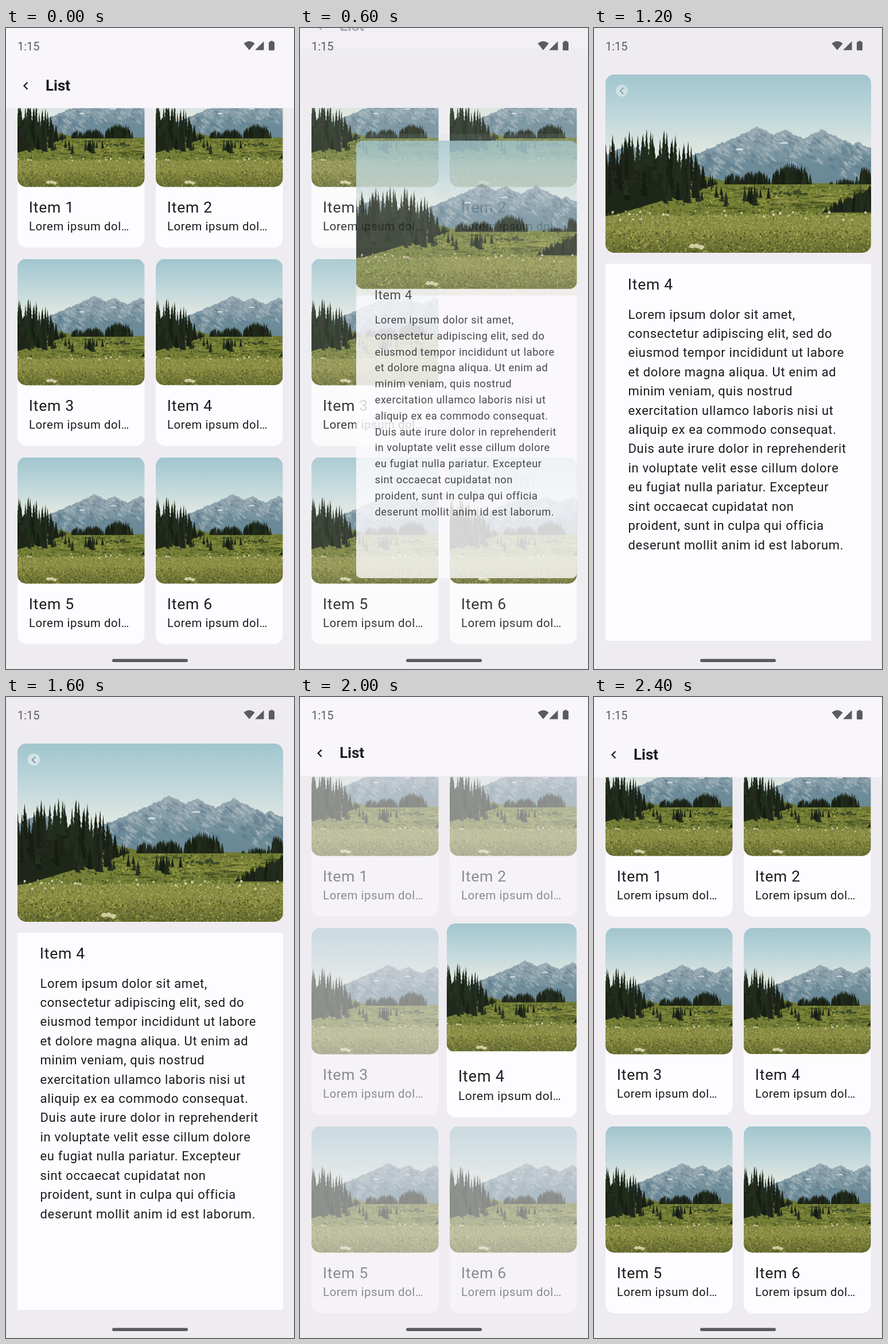
An HTML page with a canvas for the animation above (2.5 s loop, 502 px wide and 1115 px high).

```html
<!DOCTYPE html>
<html lang="en">
<head>
<meta charset="utf-8">
<title>List to detail transition</title>
<style>
  html, body { margin: 0; width: 100%; height: 100%; overflow: hidden; background: #eeecf1; }
  canvas { display: block; }
</style>
</head>
<body>
<canvas id="stage" width="502" height="1115"></canvas>
<script>
const ctx = document.getElementById('stage').getContext('2d');
ctx.imageSmoothingQuality = 'high';

const LOOP = 2500, STEP = 100, OPEN = 483, CLOSE = 1717, FADE = 700;
const PAGE = '#eeecf1', PAPER = '#fdfcfe', INK = '#1b1b1f', GREY = '#5c5b60';
const CARD = { x: 261, y: 401.5, w: 221.5, h: 325.5, image: 220 };
const DETAIL = { x: 20, y: 81, w: 463, h: 985, image: 310 };
const BODY = `Lorem ipsum dolor sit amet,
consectetur adipiscing elit, sed do
eiusmod tempor incididunt ut labore
et dolore magna aliqua. Ut enim ad
minim veniam, quis nostrud
exercitation ullamco laboris nisi ut
aliquip ex ea commodo consequat.
Duis aute irure dolor in reprehenderit
in voluptate velit esse cillum dolore
eu fugiat nulla pariatur. Excepteur
sint occaecat cupidatat non
proident, sunt in culpa qui officia
deserunt mollit anim id est laborum.`.split('\n');

// ---- Timing ----
const clamp = v => Math.max(0, Math.min(1, v));
const mix = (a, b, k) => a + (b - a) * k;

// Critically damped spring, angular frequency 20 per second
function spring(ms) {
  const x = Math.max(0, ms) * 0.02;
  return 1 - (1 + x) * Math.exp(-x);
}

// cubic-bezier(.4, 0, .2, 1)
function ease(x) {
  let lo = 0, hi = 1;
  for (let i = 0; i < 20; i++) {
    const s = (lo + hi) / 2, r = 1 - s;
    if (1.2 * r * r * s + 0.6 * r * s * s + s ** 3 < x) lo = s; else hi = s;
  }
  return 3 * (1 - lo) * lo * lo + lo ** 3;
}

// ---- Landscape ----
function makePhoto() {
  const W = DETAIL.w, H = DETAIL.image;
  const canvas = document.createElement('canvas');
  canvas.width = W;
  canvas.height = H;
  const g = canvas.getContext('2d');
  let seed = 11;
  const rand = (a = 0, b = 1) => {
    seed = (seed * 16807) % 2147483647;
    return a + (b - a) * seed / 2147483647;
  };
  const repeat = (n, draw) => { for (let i = 0; i < n; i++) draw(); };
  const wobble = x => Math.sin(x * 0.31) + Math.sin(x * 0.73 + 1) * 0.7 + Math.sin(x * 1.7) * 0.5;
  const gradient = (y0, y1, ...colors) => {
    const fill = g.createLinearGradient(0, y0, 0, y1);
    colors.forEach((c, i) => fill.addColorStop(i / (colors.length - 1), c));
    return fill;
  };
  // Fills everything between two curves of x
  const band = (fill, x0, x1, top, bottom) => {
    g.fillStyle = fill;
    g.beginPath();
    for (let x = x0; x <= x1; x++) g.lineTo(x, top(x));
    for (let x = x1; x >= x0; x--) g.lineTo(x, bottom(x));
    g.fill();
  };
  const dot = (x, y, rx, ry, color) => {
    g.fillStyle = color;
    g.beginPath();
    g.ellipse(x, y, rx, ry, 0, 0, 7);
    g.fill();
  };
  const conifer = (x, y, h) => {
    const w = Math.min(h * 0.2, 6.5);
    g.fillStyle = `hsl(${rand(85, 115)} ${rand(15, 25)}% ${rand(9, 16)}%)`;
    g.beginPath();
    g.moveTo(x, y - h);
    for (const side of [1, -1]) {
      for (let k = 1; k <= 6; k++) {
        const j = side > 0 ? k : 7 - k;
        g.lineTo(x + side * w * j / 6 * rand(0.8, 1.3), y - h + h * j / 6);
        g.lineTo(x + side * w * j / 6 * 0.55, y - h + h * j / 6);
      }
    }
    g.fill();
  };
  // Upright strokes of grass
  const grass = (n, y0, y1, size, hue, light) => repeat(n, () => {
    g.fillStyle = `hsl(${hue + rand(-8, 8)} ${rand(28, 42)}% ${light + rand(-16, 16)}%)`;
    g.fillRect(rand(-2, W), rand(y0, y1), rand(0.8, size), rand(0.8, size));
  });

  g.fillStyle = gradient(0, 135, '#a1c5ce', '#bdd6da', '#e0e7e1');
  g.fillRect(0, 0, W, H);

  // Mountains: the highest of a few peaks, with worn slopes
  const peaks = [[40, 120], [205, 117], [265, 90], [312, 95], [377, 95], [440, 117]];
  const ridge = x => Math.min(...peaks.map(([px, py]) => py + Math.abs(x - px) ** 0.9 * 0.72)) + wobble(x) * 0.9;
  band(gradient(90, 190, '#9aaab2', '#879faa', '#6d8c9a', '#6a8894'), 0, W, ridge, () => 195);
  repeat(420, () => {
    const x = rand(130, W), depth = rand() ** 1.5 * 55, y = ridge(x) + depth + 2, s = rand(2, 7);
    const lit = Math.sin(x * 0.13 + depth * 0.08) + rand(-0.8, 0.8) > 0;
    g.fillStyle = lit ? 'rgba(184,193,195,.42)' : 'rgba(84,112,130,.32)';
    g.beginPath();
    g.lineTo(x, y);
    g.lineTo(x + s, y + s * 0.9);
    g.lineTo(x + s * 1.8, y + s * 1.9);
    g.lineTo(x - s * 0.3, y + s);
    g.fill();
  });
  dot(234, 130, 7, 2, '#d3dbdd');
  dot(311, 119, 8, 1.6, '#d3dbdd');

  // Meadow
  const hill = x => 189 - 24 * Math.exp(-(((x - 120) / 65) ** 2));
  band(gradient(165, 250, '#5c6b2c', '#7a8336', '#6f7a33'), 0, W, hill, () => H);
  grass(1300, 191, 245, 4, 68, 34);
  repeat(70, () => dot(rand(140, W), rand(196, 240), rand(5, 18), rand(0.8, 2), 'rgba(50,64,28,.42)'));
  repeat(16, () => dot(rand(270, 400), rand(204, 224), rand(8, 24), rand(0.8, 2), 'rgba(160,158,76,.55)'));

  // Distant groves: centre, half width, height
  for (const [x, half, h] of [[222, 16, 22], [262, 24, 27], [325, 34, 40], [415, 24, 11], [451, 14, 34]])
    repeat(half * 1.6, () => {
      const off = rand(-1, 1);
      conifer(x + off * half, 191, h * (1 - 0.45 * off * off) * rand(0.7, 1));
    });

  // Forest on the left, falling towards the middle
  const crown = x => 111 + Math.abs(x - 90) * 0.17 + Math.max(0, x - 125) * 0.75;
  const floor = x => 249 - x * 0.3;
  band('#1d2618', 0, 130, x => crown(x) + 32 + wobble(x) * 3, floor);
  repeat(110, () => {
    const x = rand(0, 195), top = crown(x) + rand() ** 2 * 50;
    conifer(x, Math.min(top + rand(40, 62), floor(x)), Math.min(62, floor(x) - top));
  });
  repeat(24, () => {
    const x = rand(100, 172), h = rand(16, 38);
    conifer(x, rand(212, 225), h);
  });

  // Single trees and the dark right bank
  repeat(13, () => {
    const x = rand(180, 285), y = rand(206, 231);
    conifer(x, y, (y - 186) * rand(0.5, 0.8));
  });
  conifer(260, 228, 38);
  repeat(12, () => dot(rand(285, 350), rand(203, 212), rand(2, 5), 2, '#38472a'));
  band('#222c1a', 380, W, x => 238 - (x - 380) * 0.5 + wobble(x) * 2, () => 240);
  repeat(24, () => {
    const x = rand(378, W);
    conifer(x, 238, 8 + (x - 378) * 0.5 * rand(0.6, 1.1));
  });

  // Tall grass and flowers
  band(gradient(240, H, '#8d9049', '#86893f', '#5f672c'), 0, W, x => 245 + wobble(x), () => H);
  grass(2400, 241, 278, 2.4, 63, 44);
  grass(2200, 270, H, 3.2, 64, 36);
  repeat(34, () => {
    const x = rand(0, W), y = rand(235, 254), r = rand(1, 2.6);
    g.fillStyle = '#656d36';
    g.fillRect(x, y, 0.8, 13);
    dot(x, y, r, r, '#cccaa4');
  });
  for (const x of [151, 159, 167]) dot(x, 299 + wobble(x), 5, 4, '#cfcca2');
  return canvas;
}
const photo = makePhoto();

// ---- Drawing helpers ----
function text(string, x, y, size, { color = INK, weight = 400, spacing = 0 } = {}) {
  ctx.font = `${weight} ${size}px Roboto, sans-serif`;
  ctx.letterSpacing = spacing + 'px';
  ctx.fillStyle = color;
  ctx.fillText(string, x, y);
}
function roundBox(x, y, w, h, r, color) {
  ctx.beginPath();
  ctx.roundRect(x, y, w, h, r);
  if (color) {
    ctx.fillStyle = color;
    ctx.fill();
  }
}
function chevron(x, y, s, color, width) {
  ctx.beginPath();
  ctx.moveTo(x + s * 0.5, y - s);
  ctx.lineTo(x - s * 0.5, y);
  ctx.lineTo(x + s * 0.5, y + s);
  ctx.strokeStyle = color;
  ctx.lineWidth = width;
  ctx.stroke();
}

// Scales a w × h piece to the width of the box, centred vertically and clipped
function fit(box, w, h, alpha, draw) {
  const scale = box.w / w;
  ctx.save();
  ctx.beginPath();
  ctx.rect(box.x, box.y, box.w, box.h);
  ctx.clip();
  ctx.globalAlpha = alpha;
  ctx.translate(box.x, box.y + (box.h - h * scale) / 2);
  ctx.scale(scale, scale);
  draw();
  ctx.restore();
}

// Photo cropped to cover w × h, with rounded corners
function drawPhoto(w, h) {
  const width = photo.width * h / photo.height;
  ctx.save();
  roundBox(0, 0, w, h, 15);
  ctx.clip();
  ctx.drawImage(photo, (w - width) / 2, 0, width, h);
  ctx.restore();
}
function drawCard(n) {
  roundBox(0, 0, CARD.w, CARD.h, 16, PAPER);
  text('Item ' + n, 19.8, 264.5, 26.6, { spacing: 0.7 });
  text('Lorem ipsum dol…', 20, 295.5, 20.4, { spacing: 0.57 });
}
function drawDetail() {
  roundBox(0, 329, DETAIL.w, 656, 3, PAPER);
  text('Item 4', 38.8, 374, 26.6, { spacing: 0.7 });
  BODY.forEach((line, i) => text(line, 39.5, 424.5 + i * 33.42, 22, { spacing: 0.66 }));
}

// ---- Scene parts ----
function drawList(visible) {
  ctx.save();
  ctx.beginPath();
  ctx.rect(0, 139, 502, 976);
  ctx.clip();
  for (let i = 0; i < 6; i++) {
    if (i === 3) continue;
    ctx.save();
    ctx.translate(20 + (i % 2) * 241, 56.5 + Math.floor(i / 2) * 345);
    drawCard(i + 1);
    drawPhoto(CARD.w, CARD.image);
    ctx.restore();
  }
  ctx.globalAlpha = 1 - visible;
  ctx.fillStyle = PAGE;
  ctx.fillRect(0, 139, 502, 976);
  ctx.restore();
}
function drawShared(p, opening) {
  const box = {};
  for (const key of ['x', 'y', 'w', 'h']) box[key] = mix(CARD[key], DETAIL[key], p);
  const imageBox = { ...box, h: mix(CARD.image, DETAIL.image, p) };
  const sides = [
    { size: CARD, share: 1 - p, draw: () => drawCard(4) },
    { size: DETAIL, share: p, draw: drawDetail }
  ];
  if (!opening) sides.reverse();
  const [outgoing, incoming] = sides;
  outgoing.alpha = outgoing.share ** 2;
  incoming.alpha = incoming.share ** 0.6;

  ctx.save();
  roundBox(box.x, box.y, box.w, box.h, 16 * Math.sqrt(1 - p));
  ctx.clip();
  for (const { size, alpha, draw } of sides) fit(box, size.w, size.h, alpha, draw);
  for (const { size, alpha } of sides)
    fit(imageBox, size.w, size.image, alpha, () => drawPhoto(size.w, size.image));
  ctx.restore();
}
function drawHeader(hidden) {
  ctx.save();
  ctx.globalAlpha = Math.sqrt(1 - hidden);
  ctx.translate(0, -115 * hidden);
  ctx.fillStyle = '#f8f6fb';
  ctx.fillRect(0, 0, 502, 139.5);
  chevron(34.5, 100.5, 6, INK, 2.3);
  text('List', 69, 109, 26, { weight: 700 });
  ctx.restore();
}
function drawBackButton(alpha) {
  ctx.save();
  ctx.globalAlpha = alpha;
  roundBox(38, 98.5, 21, 21, 10.5, 'rgba(240,244,246,.6)');
  chevron(48.5, 109.5, 5.5, '#7f969d', 2);
  ctx.restore();
}
function drawSystemBars() {
  text('1:15', 20, 38.5, 20, { color: GREY });
  ctx.beginPath();
  ctx.moveTo(424, 38.5);
  ctx.lineTo(414.5, 27);
  ctx.quadraticCurveTo(424, 19, 433.5, 27);
  ctx.moveTo(449.5, 23);
  ctx.lineTo(449.5, 38.5);
  ctx.lineTo(434, 38.5);
  ctx.fill();
  roundBox(458, 24, 10, 15, 1.5, GREY);
  roundBox(460.5, 22.5, 5, 3, 0.5, GREY);
  roundBox(185, 1097.5, 132, 5.5, 2.7, '#5a595d');
}

function render(t) {
  const opening = t < CLOSE;
  const since = t - (opening ? OPEN : CLOSE);
  const p = opening ? spring(since) : 1 - spring(since);
  const fade = ease(clamp(since / FADE));
  const listAlpha = opening ? 1 - fade : fade;
  const button = opening ? clamp((t - 950) / 300) : clamp(1 - since / 130);

  ctx.fillStyle = PAGE;
  ctx.fillRect(0, 0, 502, 1115);
  drawList(listAlpha ** 1.6);
  drawShared(p, opening);
  drawHeader(opening ? spring(t - 405) : p);
  drawBackButton(button);
  drawSystemBars();
}

// The picture refreshes ten times a second
function frame(now) {
  render(Math.floor(now % LOOP / STEP) * STEP);
  requestAnimationFrame(frame);
}
requestAnimationFrame(frame);
</script>
</body>
</html>
```
